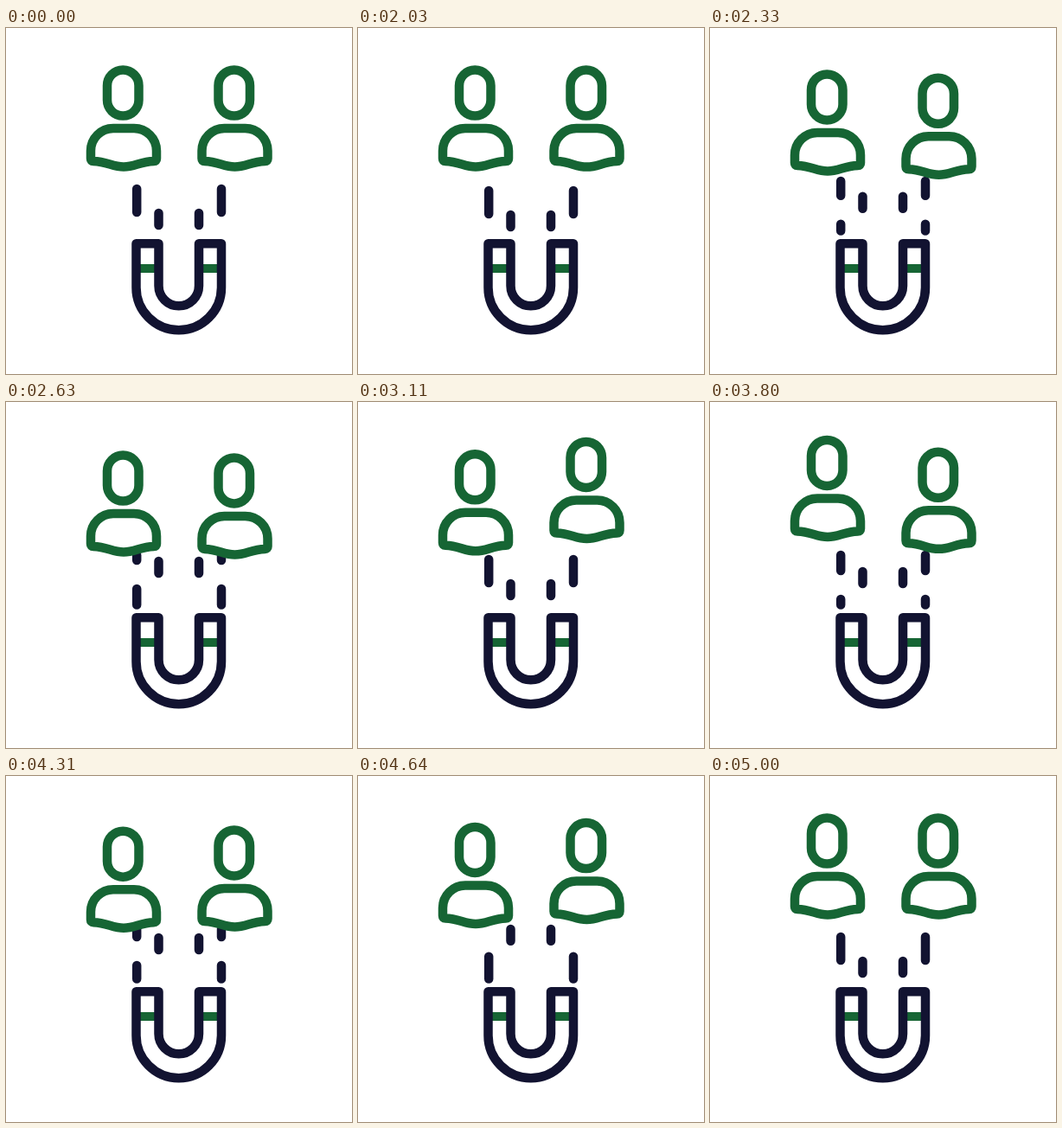
Animation, 400 px wide and 400 px high, one loop 5.12 s. Source, as an HTML page:

```html
<!DOCTYPE html>
<html lang="en">
<head>
<meta charset="utf-8">
<title>Magnet attracting people</title>
<style>
  html, body { margin: 0; width: 100%; height: 100%; overflow: hidden; background: #fff; }
  svg { display: block; width: 100vw; height: 100vh; }
  .line { fill: none; stroke-width: 10.5; stroke-linecap: round; stroke-linejoin: round; }
  .green { stroke: #166534; }
  .navy { stroke: #121331; }
  .bar { stroke-linecap: butt; stroke-width: 10; }
  .long { stroke-dasharray: 27 33; }
  .short { stroke-dasharray: 14 46; }
</style>
</head>
<body>
<svg viewBox="0 0 400 400">
  <defs>
    <g id="person">
      <rect x="117" y="48.5" width="36.5" height="53" rx="18.2"/>
      <path d="M98 142A26 26 0 0 1 124 116H148A26 26 0 0 1 174 142V151Q174 154 171 154C155 154.500 149 160.500 136 160.500C123 160.500 117 154.500 101 154Q98 154 98 151Z"/>
    </g>
  </defs>
  <g class="line navy">
    <path class="long" d="M151.200 177V234.500"/>
    <path class="long" d="M249 177V234.500"/>
    <path class="short" d="M176.500 177V234.500"/>
    <path class="short" d="M223 177V234.500"/>
  </g>
  <path class="line green bar" d="M152 278H175M225 278H247"/>
  <path class="line navy" d="M150.500 249.300H176.500V298A23.250 23.250 0 0 0 223 298V249.300H249V300A49.250 49.250 0 0 1 150.500 300Z"/>
  <g class="line green">
    <use id="left" href="#person"/>
    <use id="right" href="#person"/>
  </g>
</svg>
<script>
  const LOOP = 5120, START = 2000, END = 5000, STEP = 30;

  // [time, vertical shift] at the turning points
  const leftKeys = [[2000, 0], [2880, 16], [3680, -6], [4400, 16], [5000, 0]];
  const rightKeys = [[2000, 0], [2600, 16], [3290, -6], [4100, 16], [5000, 0]];
  // [time, distance the dashes have travelled]; they repeat every 60
  const flowKeys = [[2000, 0], [2030, 2], [2630, 90], [3110, 176], [3800, 342], [4310, 453], [5000, 540]];

  const left = document.getElementById('left');
  const right = document.getElementById('right');
  const dashes = [['.long', 9], ['.short', 37]].flatMap(([name, lead]) =>
    [...document.querySelectorAll(name)].map(el => ({ el, lead })));

  function segment(keys, t) {
    let i = 0;
    while (i < keys.length - 2 && t >= keys[i + 1][0]) i++;
    const span = keys[i + 1][0] - keys[i][0];
    return { i, span, u: (t - keys[i][0]) / span };
  }

  function swing(keys, t) {
    const { i, u } = segment(keys, t);
    const a = keys[i][1], b = keys[i + 1][1];
    return a + (b - a) * (1 - Math.cos(Math.PI * u)) / 2;
  }

  const slope = (keys, i) => (keys[i + 1][1] - keys[i][1]) / (keys[i + 1][0] - keys[i][0]);

  // harmonic mean of the neighbouring slopes keeps the curve rising
  function tangent(keys, i) {
    if (i === 0) return slope(keys, 0);
    if (i === keys.length - 1) return slope(keys, i - 1) / 2;
    const a = slope(keys, i - 1), b = slope(keys, i);
    return 2 * a * b / (a + b);
  }

  function glide(keys, t) {
    const { i, span, u } = segment(keys, t);
    const v = 1 - u;
    return keys[i][1] * v * v * (1 + 2 * u) + keys[i + 1][1] * u * u * (3 - 2 * u)
      + span * u * v * (tangent(keys, i) * v - tangent(keys, i + 1) * u);
  }

  function draw(time) {
    const ms = time % LOOP;
    const held = START + Math.floor((ms - START) / STEP) * STEP;
    const t = Math.min(END, Math.max(START, held));
    const flow = glide(flowKeys, t) % 60;
    left.setAttribute('transform', `translate(0 ${swing(leftKeys, t)})`);
    right.setAttribute('transform', `translate(128.500 ${swing(rightKeys, t)})`);
    for (const { el, lead } of dashes) el.style.strokeDashoffset = -(lead + flow);
  }

  const begin = performance.now();
  function tick() {
    draw(performance.now() - begin);
    requestAnimationFrame(tick);
  }
  tick();
</script>
</body>
</html>
```
